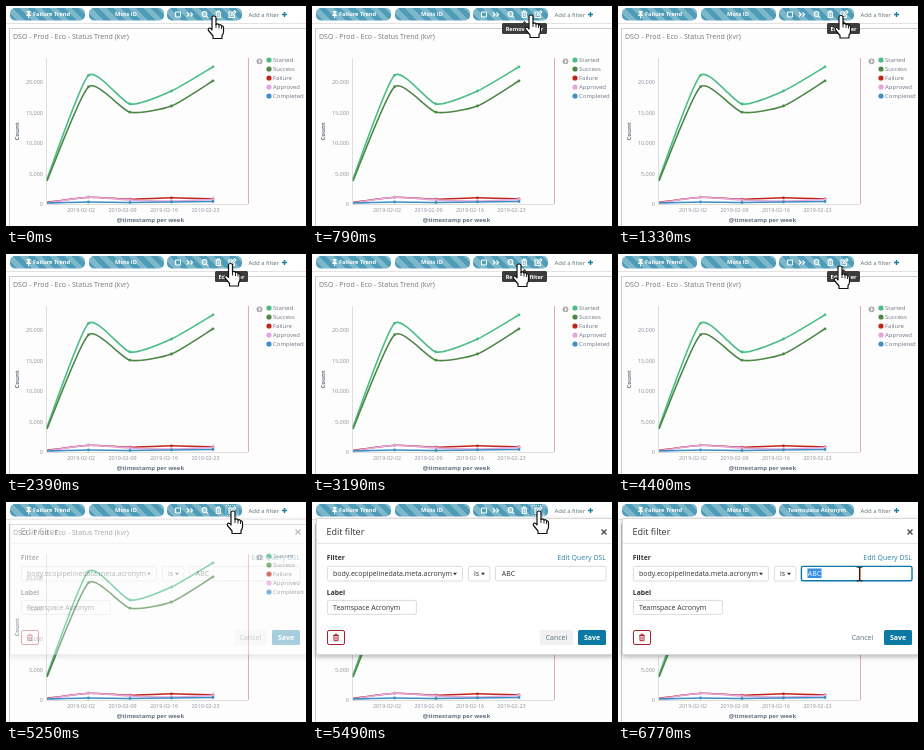
An HTML page for the animation above (8000 ms loop, 300 by 220 pixels).

```html
<!DOCTYPE html>
<html lang="en">
<head>
<meta charset="utf-8">
<title>Editing a dashboard filter</title>
<style>
  html, body { margin: 0; width: 100%; height: 100%; overflow: hidden; background: #fff; }
  svg { display: block; width: 300px; height: 220px; font: 7px "Open Sans", sans-serif; }
  .bold { font-weight: 700; }
  .mid { text-anchor: middle; }
  .end { text-anchor: end; }
  .line { fill: none; stroke-width: 1.6; }
  .icon { fill: none; stroke: #fff; stroke-width: 1.1; }
  .field { fill: #fff; stroke: #d3d3d3; stroke-width: .8; }
</style>
</head>
<body>
<svg viewBox="0 0 300 220">
  <defs>
    <linearGradient id="stripes" gradientUnits="userSpaceOnUse" spreadMethod="repeat" x1="0" y1="12.5" x2="7.4" y2="5.1">
      <stop offset=".5" stop-color="#4e9cb8"/>
      <stop offset=".5" stop-color="#7cb7ca"/>
    </linearGradient>
    <filter id="shadow" x="-10%" y="-10%" width="120%" height="125%">
      <feDropShadow dx="0" dy="2" stdDeviation="2.5" flood-opacity=".28"/>
    </filter>
  </defs>

  <path d="M0 17.500H300" stroke="#e2e2e2"/>
  <rect x="3.500" y="22.500" width="300" height="200" fill="#fdfdfd" stroke="#cacaca"/>

  <g id="pills" fill="url(#stripes)"></g>
  <g class="bold mid" font-size="5.7" fill="#fff">
    <path d="M20.600 5h4v1l-1 .5v1.500l1.400 1.200v.8h-4.800v-.8L21.600 8V6.500l-1-.5zM22.200 10h.8v2.400h-.8z"/>
    <text x="45.500" y="10.400">Failure Trend</text>
    <text x="120" y="10.400">Mots ID</text>
    <text id="pillName" x="199" y="10.400">Teamspace Acronym</text>
  </g>
  <g id="icons" class="icon">
    <rect x="169.500" y="6" width="5" height="5" rx=".8"/>
    <path d="M181 6.500l2 2-2 2M184.500 6.500l2 2-2 2"/>
    <circle cx="198.500" cy="8" r="2.400"/>
    <path d="M197.300 8h2.400M200.300 9.800l2 2"/>
    <path id="trash" d="M209.500 6.300h5.600M211.300 6v-1h2v1M210.300 6.500v5h4v-5M212.300 7.500v3"/>
    <path d="M226.500 6h-3.500v5.500h5.500V9M225.300 9.300l.4-1.600 3-3 1.300 1.300-3 3z"/>
    <rect id="focus" x="220" y="3.500" width="12" height="10" stroke-width=".8" stroke-dasharray="1 1"/>
  </g>
  <text x="242.500" y="10.600" font-size="6" fill="#5b6b75">Add a filter</text>
  <path d="M276 8.500h5M278.500 6v5" stroke="#1b7aa5" stroke-width="1.400"/>

  <text x="7" y="33" fill="#777">DSO - Prod - Eco - Status Trend (kvr)</text>
  <g id="chart" fill="#8b919c">
    <path d="M40.500 52V198.500H242" fill="none" stroke="#ddd"/>
    <path d="M242.500 52V198" stroke="#e2adb0"/>
    <circle cx="253.500" cy="55.300" r="2.900" fill="#aaa"/>
    <path d="M252.800 53.800l1.500 1.500-1.500 1.500" class="icon" stroke-width=".8"/>
    <g class="bold mid" font-size="6" fill="#66707f">
      <text transform="translate(13 125.500) rotate(-90)">Count</text>
      <text x="144.500" y="216">@timestamp per week</text>
    </g>
  </g>

  <g id="tip">
    <path id="tipArrow" fill="#3c3c3c"/>
    <rect id="tipBox" y="17" height="11" rx="1.500" fill="#3c3c3c"/>
    <text id="tipText" class="bold mid" y="24.600" font-size="5.600" fill="#fff"></text>
  </g>

  <g id="dialog" fill="#333">
    <rect x="4.500" y="16.500" width="297" height="136" fill="#fff" stroke="#d9d9d9" filter="url(#shadow)"/>
    <text x="14.500" y="33" font-size="9">Edit filter</text>
    <path d="M289.500 27.500l5 5m0-5l-5 5" stroke="#555" stroke-width="1.500"/>
    <path d="M5 41.500H300" stroke="#e4e4e4"/>
    <text class="bold" x="14.800" y="58" font-size="6.800">Filter</text>
    <text class="end" x="294" y="58" fill="#2f83a3">Edit Query DSL</text>
    <rect class="field" x="15.400" y="64.400" width="135" height="14.600" rx="1.500"/>
    <text x="21" y="74">body.ecopipelinedata.meta.acronym</text>
    <rect class="field" x="156.400" y="64.400" width="21.500" height="14.600" rx="1.500"/>
    <text x="162" y="74">is</text>
    <path d="M141 70.800h4l-2 2.400zM169 70.800h4l-2 2.400z"/>
    <rect id="value" class="field" x="183.400" y="64.400" width="110.600" height="14.400" rx="1.500"/>
    <rect id="selection" x="189.500" y="66.500" width="14" height="9.500" fill="#3390e8"/>
    <text id="valueText" x="189.800" y="73.600">ABC</text>
    <text class="bold" x="14.800" y="92.500" font-size="6.800">Label</text>
    <rect class="field" x="15.400" y="98.400" width="89" height="14" rx="1.500"/>
    <text x="21" y="108">Teamspace Acronym</text>
    <rect x="15.500" y="128.500" width="17" height="14" rx="1.500" fill="#fff" stroke="#a8232b"/>
    <use href="#trash" x="-188.300" y="127.200" fill="none" stroke="#a8232b"/>
    <rect id="cancelBox" x="228" y="128" width="33" height="15" rx="1.500" fill="#f1f1f1"/>
    <text class="mid" x="244.500" y="138.200" fill="#5c7480">Cancel</text>
    <rect x="266" y="128" width="28" height="15" rx="1.500" fill="#0a79a3"/>
    <text class="bold mid" x="280" y="138.200" fill="#fff">Save</text>
  </g>

  <g id="hand" stroke="#111" stroke-width="1.200" stroke-linejoin="round" fill="#fff">
    <path d="M-2 13V1.500Q-2 0 0 0T2 1.500V8.500Q3.800 7 5 9Q6.800 8 7.500 10Q9.500 9.300 9.500 12V16Q9.500 18 8 19.500V22.500H-1V20L-5.500 14.500Q-6.300 12.500-4.500 12Q-3.200 12-2 14z"/>
    <path d="M2 8v4M5 9v3.500M7.500 10v3" fill="none" stroke-width=".9"/>
  </g>
  <path id="arrow" d="M0 0V14L3.300 11 5.500 16 7.500 15 5.500 10.500H10z" fill="#fff" stroke="#111"/>
  <g id="beam" fill="none">
    <path d="M.8-6.500V6.500" stroke="#e0722f"/>
    <path d="M-3-7Q0-7 0-5.500Q0-7 3-7M0-6V6M-3 7Q0 7 0 5.500Q0 7 3 7" stroke="#2b2320" stroke-width="1.100"/>
  </g>
</svg>
<script>
const DURATION = 8000;
const $ = id => document.getElementById(id);

function add(parent, tag, attrs, text = '') {
  const node = document.createElementNS('http://www.w3.org/2000/svg', tag);
  for (const key in attrs) node.setAttribute(key, attrs[key]);
  node.textContent = text;
  parent.append(node);
  return node;
}

// Cardinal spline through evenly spaced weekly points.
function spline(ys) {
  const points = ys.map((y, i) => [41 + i * 41.5, y]);
  const handle = (i, sign) => {
    const before = points[Math.max(i - 1, 0)], after = points[Math.min(i + 1, 4)];
    return points[i].map((v, k) => v + sign * .1 * (after[k] - before[k]));
  };
  return points.map((p, i) => i ? `C${handle(i - 1, 1)} ${handle(i, -1)} ${p}` : `M${p}`).join('');
}

for (const x of [4, 83, 161])
  add($('pills'), 'rect', { width: 75, height: 12.5, rx: 5, transform: `translate(${x} 2)` });

const chart = $('chart');
['20,000', '15,000', '10,000', '5,000', '0'].forEach((label, i) =>
  add(chart, 'text', { x: 37, y: 78 + i * 30.5, class: 'end', 'font-size': 5.5 }, label));
['02', '09', '16', '23'].forEach((day, i) =>
  add(chart, 'text', { x: 75 + i * 41.5, y: 206, class: 'mid', 'font-size': 5.4 }, '2019-02-' + day));

[
  ['Started', '#4bbd88', [173, 69.4, 98, 85, 60.8]],
  ['Success', '#4c8745', [175, 80.8, 106.2, 100, 74.8]],
  ['Failure', '#c0261c', [196.5, 191.2, 193.2, 191.8, 193]],
  ['Approved', '#e3a5dc', [197, 191.2, 194, 195, 193.5]],
  ['Completed', '#3d8fc4', [197, 196, 196.5, 196, 195.5]],
].forEach(([name, color, ys], row) => {
  add(chart, 'path', { d: spline(ys), class: 'line', stroke: color });
  ys.slice(1).forEach((cy, i) => add(chart, 'circle', { cx: 82.5 + i * 41.5, cy, r: 1.4, fill: color }));
  add(chart, 'circle', { cx: 263, cy: 54 + row * 9, r: 2.6, fill: color });
  add(chart, 'text', { x: 267, y: 56.2 + row * 9, 'font-size': 6, fill: '#6f7683' }, name);
});

// Each step: start time, then the values held until the next step.
const handSteps = [
  [0, 208, 10], [120, 208, 7], [240, 208, 5.5], [520, 209, 6], [640, 212, 7],
  [790, 219, 9], [910, 221, 9], [1200, 222, 9], [1330, 223, 9.5], [2390, 224.5, 9.5],
  [2530, 222, 10], [2650, 216, 10], [2780, 210, 10], [2900, 208, 10], [3190, 207, 10],
  [3310, 204, 10], [3430, 201, 10], [3860, 202, 11], [3980, 206, 12], [4130, 212, 13],
  [4260, 218, 13], [4400, 222, 12], [4530, 223, 12], [4670, 226, 10], [4820, 227, 9],
];
const beamSteps = [[0, 247], [5940, 243], [6070, 237], [6770, 241.5]];
const tips = {
  remove: ['Remove filter', 212.5, 45],
  edit: ['Edit filter', 225.5, 33],
  exclude: ['Exclude matches', 199.5, 55],
};
const tipSteps = [
  [0, 'remove', 0], [120, 'remove', .5], [240, 'remove', 1], [1060, 'edit', .5], [1200, 'edit', 1],
  [2780, 'remove', .5], [2900, 'remove', 1], [3310, 'exclude', .3], [3430, 'exclude', .7],
  [3580, 'exclude', 1], [4130, 'exclude', .5], [4260, 'edit', .5], [4400, 'edit', 1], [5250, 'edit', 0],
];
const dialogSteps = [[0, 0], [5250, .35], [5370, .8], [5490, 1]];

const at = (steps, t) => steps.findLast(step => step[0] <= t).slice(1);
const show = (id, visible) => $(id).style.display = visible ? '' : 'none';
const place = (id, x, y) => $(id).setAttribute('transform', `translate(${x} ${y})`);

function draw(t) {
  const saved = t >= 5640, focused = t >= 6220, selected = t >= 6340;
  place('hand', ...at(handSteps, t));
  place('arrow', 243, 30.5);
  place('beam', at(beamSteps, t)[0], 72);
  show('hand', !saved);
  show('arrow', saved && t < 5790);
  show('beam', t >= 5790);

  const [kind, opacity] = at(tipSteps, t);
  const [label, center, width] = tips[kind];
  $('tip').style.opacity = opacity;
  $('tipText').textContent = label;
  $('tipText').setAttribute('x', center);
  $('tipBox').setAttribute('x', center - width / 2);
  $('tipBox').setAttribute('width', width);
  $('tipArrow').setAttribute('d', `M${center - 2.5} 17.5l2.5-2.5 2.5 2.5z`);

  const [dialogOpacity] = at(dialogSteps, t);
  $('dialog').style.opacity = dialogOpacity;
  show('dialog', dialogOpacity > 0);
  show('icons', !saved);
  show('pillName', saved);
  show('focus', t >= 4980);
  show('cancelBox', !saved);
  show('selection', selected);
  $('valueText').style.fill = selected ? '#fff' : '';
  $('value').style.stroke = focused ? '#0a79a3' : '';
  $('value').style.strokeWidth = focused ? 1.4 : '';
}

function tick() {
  draw(performance.now() % DURATION);
  requestAnimationFrame(tick);
}
tick();
</script>
</body>
</html>
```
